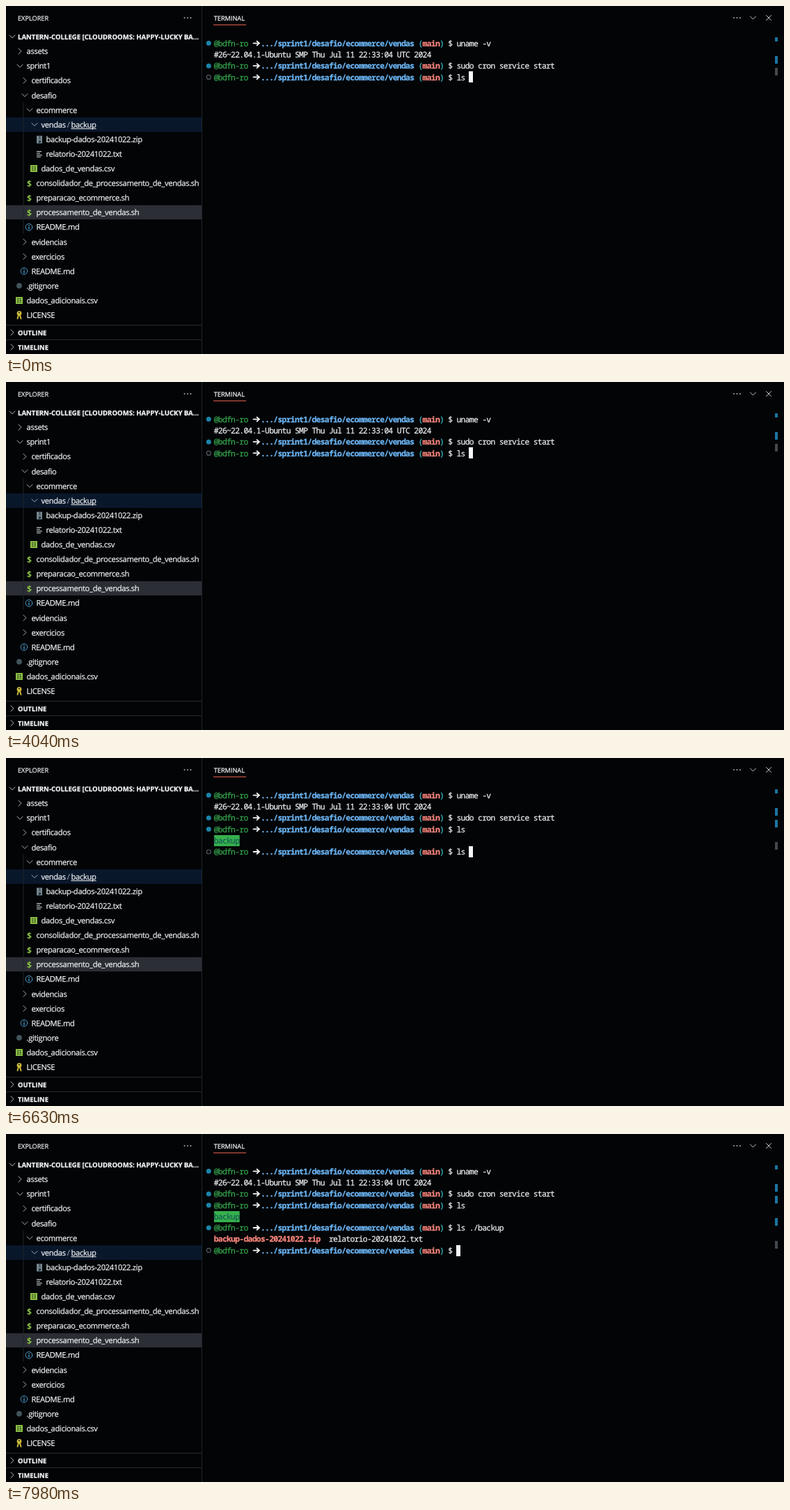
An HTML page with a canvas that plays this animation: 1118 px wide and 501 px high, repeating every 8 s.

```html
<!DOCTYPE html>
<html lang="pt">
<head>
<meta charset="utf-8">
<title>Terminal</title>
<style>
  html, body { margin: 0; width: 100%; height: 100%; overflow: hidden; background: #020406; }
  canvas { display: block; }
</style>
</head>
<body>
<canvas id="stage" width="1118" height="501"></canvas>
<script>
const ctx = document.getElementById('stage').getContext('2d');
ctx.textRendering = 'geometricPrecision';
ctx.lineCap = 'round';
ctx.lineJoin = 'round';

const LOOP = 8000;
const UI = '"Open Sans", "Noto Sans", sans-serif';
const MONO = '"Noto Sans Mono", "DejaVu Sans Mono", monospace';
const C = {
  bg: '#020406', text: '#eceff2', white: '#f5f7f9', dim: '#8b949e', line: '#20262c',
  green: '#35a54b', blue: '#6cb6f5', cyan: '#39c5cf', red: '#f9857c',
  teal: '#1d84a8', lime: '#8dc149', info: '#4f9fd0', gold: '#cbb93f'
};

// Terminal grid
const CELL = 6.12, LEFT = 299, TOP = 53.6, ROW = 16.28, PROMPT_COLS = 57;
const USER = '@bdfn-ro';
const PATH = '.../sprint1/desafio/ecommerce/vendas';

const TREE = [
  [0, 'assets', 'right'], [0, 'sprint1', 'down'],
  [1, 'certificados', 'right'], [1, 'desafio', 'down'], [2, 'ecommerce', 'down'],
  [3, 'vendas', 'down'], [4, 'backup-dados-20241022.zip', 'zip'],
  [4, 'relatorio-20241022.txt', 'txt'], [3, 'dados_de_vendas.csv', 'csv'],
  [2, 'consolidador_de_processamento_de_vendas.sh', 'shell'],
  [2, 'preparacao_ecommerce.sh', 'shell'], [2, 'processamento_de_vendas.sh', 'shell'],
  [2, 'README.md', 'info'], [1, 'evidencias', 'right'], [1, 'exercicios', 'right'],
  [1, 'README.md', 'info'], [0, '.gitignore', 'dot'],
  [0, 'dados_adicionais.csv', 'csv'], [0, 'LICENSE', 'key']
];

function rect(x, y, w, h, color) {
  ctx.fillStyle = color;
  ctx.fillRect(x, y, w, h);
}

function disc(x, y, r, color) {
  ctx.fillStyle = color;
  ctx.beginPath();
  ctx.arc(x, y, r, 0, 7);
  ctx.fill();
}

function ring(x, y, r, color, width = 1) {
  ctx.strokeStyle = color;
  ctx.lineWidth = width;
  ctx.beginPath();
  ctx.arc(x, y, r, 0, 7);
  ctx.stroke();
}

function stroke(color, width, ...points) {
  ctx.strokeStyle = color;
  ctx.lineWidth = width;
  ctx.beginPath();
  points.forEach(([x, y], i) => i ? ctx.lineTo(x, y) : ctx.moveTo(x, y));
  ctx.stroke();
}

// A hairline outline gives the slightly heavy screen text
function ink(str, x, y, color) {
  ctx.fillStyle = ctx.strokeStyle = color;
  ctx.lineWidth = .25;
  ctx.fillText(str, x, y);
  ctx.strokeText(str, x, y);
}

function label(str, x, y, size = 11.2, color = C.text, weight = 400) {
  ctx.font = `${weight} ${size}px ${UI}`;
  ctx.letterSpacing = size > 10 ? '-0.32px' : '0px';
  ctx.textAlign = 'left';
  ink(str, x, y, color);
  const end = x + ctx.measureText(str).width;
  ctx.letterSpacing = '0px';
  return end;
}

function chevron(x, y, down, color = '#a9b0b7') {
  if (down) stroke(color, 1, [x - 4, y - 2], [x, y + 2], [x + 4, y - 2]);
  else stroke(color, 1, [x - 2, y - 4], [x + 2, y], [x - 2, y + 4]);
}

function ellipsis(x, y) {
  for (let i = -1; i <= 1; i++) rect(x + i * 4.5 - .8, y - .8, 1.6, 1.6, '#c4cad0');
}

const icons = {
  right: (x, y) => chevron(x + 1, y, false),
  down: (x, y) => chevron(x + 1, y, true),
  zip(x, y) {
    rect(x - 3, y - 5, 8, 11, '#71838d');
    rect(x + 1, y - 5, 1, 5, '#2a333a');
    rect(x, y + 2, 3, 3, '#2a333a');
  },
  txt(x, y) {
    [7, 5, 8, 6].forEach((w, i) => rect(x - 3, y - 4 + i * 2.6, w, 1.2, '#b9c1c7'));
  },
  csv(x, y) {
    rect(x - 5, y - 5, 10, 10, C.lime);
    for (let i = 0; i < 2; i++)
      for (let j = 0; j < 3; j++) rect(x - 3 + i * 3.6, y - 3 + j * 2.4, 2.4, 1.2, '#2f471c');
  },
  shell(x, y) { label('$', x - 3, y + 4.5, 12, C.lime, 600); },
  info(x, y) {
    ring(x, y, 4.8, C.info);
    rect(x - .7, y - 2.8, 1.4, 1.4, C.info);
    rect(x - .7, y - .6, 1.4, 3.6, C.info);
  },
  dot(x, y) { disc(x, y, 4, '#41535b'); },
  key(x, y) {
    disc(x, y - 2.6, 3.4, C.gold);
    rect(x - .8, y - 4.4, 1.6, 1.6, C.bg);
    stroke(C.gold, 2, [x - 1, y], [x - 2.4, y + 5]);
    stroke(C.gold, 2, [x + 1, y], [x + 2.4, y + 5]);
  }
};

function drawSidebar() {
  label('EXPLORER', 17, 20.8, 9.2);
  ellipsis(261, 17);
  rect(0, 160.3, 281, 20.9, '#09172b');
  rect(0, 286.8, 281, 20.5, '#2b2e34');
  rect(24.5, 139, 1, 189, C.line);

  chevron(9, 44, true);
  label('LANTERN-COLLEGE [CLOUDROOMS: HAPPY-LUCKY BA...', 17, 47.5, 9.6, C.white, 700);

  TREE.forEach(([depth, name, icon], i) => {
    const x = 29.5 + depth * 7, y = 65.2 + i * 21.1;
    icons[icon](x - 10.5, y);
    const end = label(name, x, y + 4);
    if (name === 'vendas') {
      label('/', end + 2, y + 4, 11.2, C.dim);
      const right = label('backup', 93.5, y + 4);
      rect(93.5, y + 5.5, right - 93.5, 1, C.text);
    }
  });

  [['OUTLINE', 470], ['TIMELINE', 491]].forEach(([name, y]) => {
    rect(0, y - 11, 281, 1, '#272d34');
    chevron(9, y, false);
    label(name, 17, y + 3.6, 9.4, C.white, 700);
  });
  rect(281, 0, 1, 501, '#20252b');
}

function drawPanelHead() {
  label('TERMINAL', 298.7, 20.8, 9.2, C.white);
  rect(298, 26.5, 47, 1.2, '#d0574b');
  ellipsis(1050.5, 17);
  chevron(1073.5, 17, true, '#c4cad0');
  stroke('#c4cad0', 1, [1092.5, 13.5], [1099.5, 20.5]);
  stroke('#c4cad0', 1, [1099.5, 13.5], [1092.5, 20.5]);
}

const rowY = row => TOP + row * ROW;

function cells(str, col, row, color, weight = 400) {
  ctx.font = `${weight} 11.4px ${MONO}`;
  ctx.textAlign = 'center';
  [...str].forEach((ch, i) => {
    if (ch !== ' ') ink(ch, LEFT + (col + i + .5) * CELL, rowY(row) + 4.2, color);
  });
}

function arrow(col, row) {
  const x = LEFT + col * CELL + 1.5, y = rowY(row);
  stroke(C.white, 1.8, [x, y], [x + 8, y]);
  stroke(C.white, 1.8, [x + 5, y - 3], [x + 8.4, y], [x + 5, y + 3]);
}

function mark(row, done) {
  const y = rowY(row);
  if (done) disc(291.3, y, 3.5, C.teal);
  else ring(291.3, y, 3, '#555c63', 1.2);
  const top = Math.round(39.8 + row * ROW);
  rect(1105, row ? top : 45, 4, row ? 11 : 6, done ? '#1a76a2' : '#43494f');
}

function prompt(row, command, done) {
  mark(row, done);
  cells(USER, 0, row, C.green);
  arrow(9, row);
  cells(PATH, 11, row, C.blue, 600);
  cells('(', 48, row, C.cyan);
  cells('main', 49, row, C.red, 600);
  cells(')', 53, row, C.cyan);
  cells('$', 55, row, C.text);
  cells(command, PROMPT_COLS, row, C.text);
  if (!done) {
    const x = LEFT + (PROMPT_COLS + command.length) * CELL;
    rect(Math.round(x - .8), Math.round(rowY(row) - 8), 6, 16, C.white);
  }
}

const ENTER_LS = 4910, ERASE = 5720, RETYPE = 6130, ENTER_BACKUP = 7650;
const typed = (str, t, start, step) =>
  str.slice(0, Math.max(0, Math.floor((t - start) / step) + 1));

function command(t) {
  if (t < ERASE) return typed('cd backu', t, 4970, 52);
  if (t < RETYPE) return 'cd backu'.slice(0, Math.max(0, 7 - Math.floor((t - ERASE) / 42)));
  return typed('ls ', t, RETYPE, 140) + typed('./backup', t, 6700, 112);
}

function drawTerminal(t) {
  prompt(0, 'uname -v', true);
  cells('#26~22.04.1-Ubuntu SMP Thu Jul 11 22:33:04 UTC 2024', 0, 1, C.text);
  prompt(2, 'sudo cron service start', true);

  const listed = t >= ENTER_LS, opened = t >= ENTER_BACKUP;
  prompt(3, listed ? 'ls' : 'ls ', listed);
  if (!listed) return;
  rect(LEFT, Math.round(rowY(4) - 8), 6 * CELL, 16, '#36b04c');
  cells('backup', 0, 4, '#146052');
  prompt(5, opened ? 'ls ./backup' : command(t), opened);
  if (!opened) return;
  cells('backup-dados-20241022.zip', 0, 6, C.red, 600);
  cells('relatorio-20241022.txt', 27, 6, C.text);
  prompt(7, '', false);
}

function frame(now) {
  rect(0, 0, 1118, 501, C.bg);
  drawSidebar();
  drawPanelHead();
  drawTerminal(now % LOOP);
  requestAnimationFrame(frame);
}
frame(0);
</script>
</body>
</html>
```
